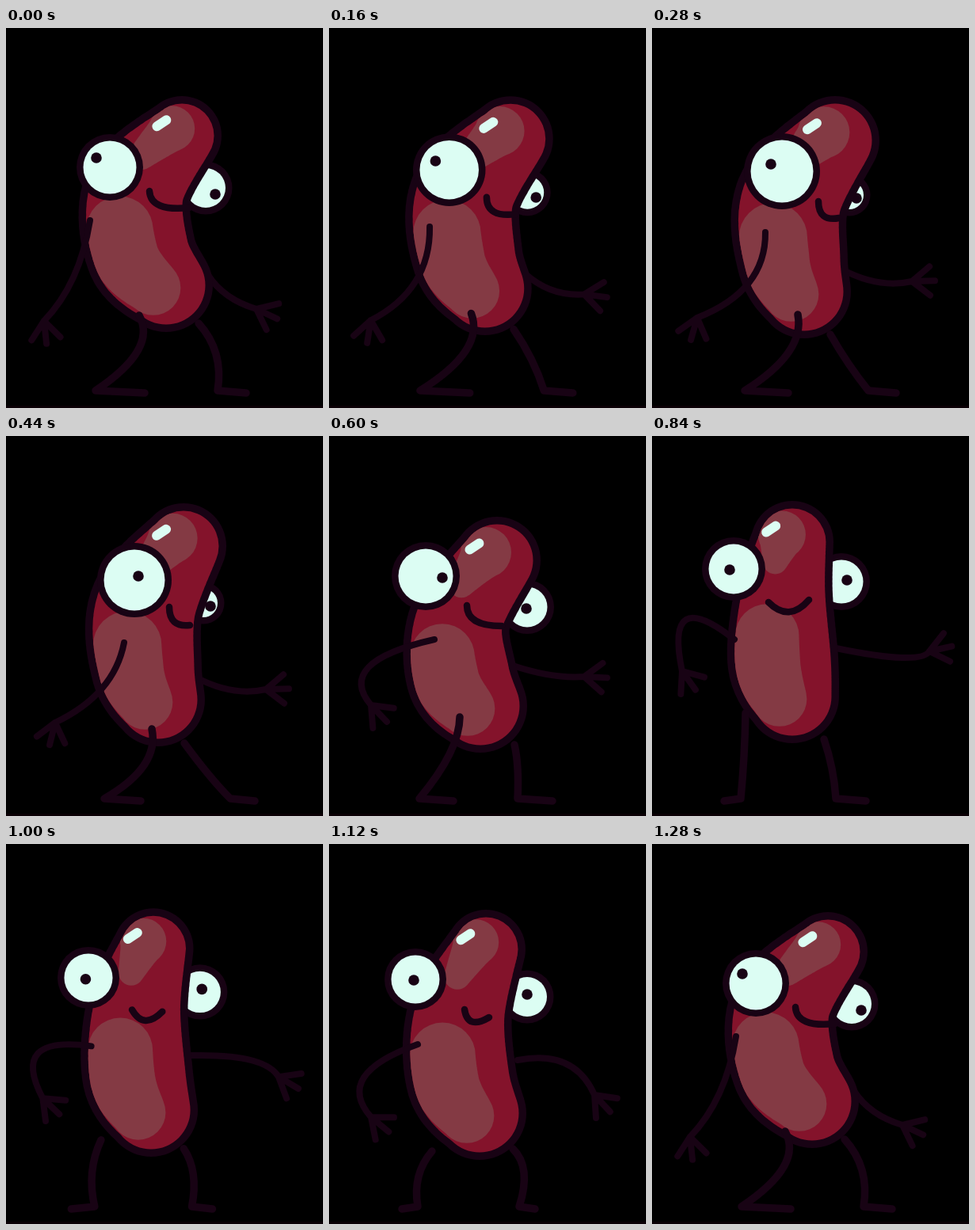
Recreate the animation shown at these times as an HTML page with a canvas. Size 400x480 px, loop 1320 ms.

```html
<!DOCTYPE html>
<html lang="en">
<head>
<meta charset="utf-8">
<title>Walking bean</title>
<style>
html, body { margin: 0; width: 100%; height: 100%; overflow: hidden; background: #000; }
canvas { display: block; width: 100vw; height: 100vh; }
</style>
</head>
<body>
<canvas id="stage" width="400" height="480"></canvas>
<script>
const ctx = document.getElementById('stage').getContext('2d');
const INK = '#180314', RED = '#84132b', SHINE = '#843a44', WHITE = '#dcfdf3';
const LOOP = 1320, STEP = 40, RETURN = 1280, GROUND = 458;

// head, chest: x, y, r.  hip: x, y.  eyes: x, y, r, pupil x, y.  mouth: its two ends.
// arms: shoulder, elbow, wrist.  legs: hip, knee, ankle x, foot length.
const start = {
  time: 0,
  head: [222,136,45], chest: [166,205,63], hip: [202,325],
  eyeL: [131,176,33.5, 114,164], eyeR: [252,202,25, 264,210], mouth: [181,206, 231,227],
  armL: [106,243, 85,315, 48,370], armR: [255,312, 280,338, 316,355],
  legL: [168,363, 166,408, 113,62], legR: [243,373, 265,412, 267,36]
};
const stride = {
  time: 280,
  head: [231,142,51], chest: [177,215,67], hip: [192,333],
  eyeL: [164,181,39.5, 150,172], eyeR: [249,211,18, 258,215], mouth: [210,219, 236,240],
  armL: [143,258, 122,322, 57,366], armR: [240,305, 285,321, 328,320],
  legL: [184,362, 172,410, 117,55], legR: [225,387, 248,424, 273,35]
};
const poses = [
  start,
  stride,
  {
    ...stride,
    time: 440,
    head: [224,139,49], eyeL: [162,182,38.5, 167,177], mouth: [206,216, 232,239],
    armL: [149,261, 121,319, 62,362],
    legL: [184,370, 174,416, 124,46], legR: [225,388, 256,428, 283,31]
  },
  {
    time: 600,
    head: [212,157,50], chest: [165,232,59], hip: [191,341],
    eyeL: [122,177,34.5, 143,179], eyeR: [250,216,25.5, 249,218], mouth: [174,214, 218,240],
    armL: [133,257, 50,292, 53,340], armR: [232,290, 280,302, 322,304],
    legL: [165,355, 152,402, 114,43], legR: [234,390, 238,420, 238,44]
  },
  {
    time: 840,
    head: [177,134,47], chest: [166,200,57], hip: [177,329],
    eyeL: [103,168,31.5, 98,169], eyeR: [239,184,27.5, 246,182], mouth: [147,210, 198,207],
    armL: [104,257, 43,232, 38,297], armR: [232,268, 315,280, 350,272],
    legL: [118,350, 116,405, 112,-21], legR: [217,383, 227,420, 232,38]
  },
  {
    time: 1120,
    head: [198,133,45], chest: [165,215,61], hip: [190,340],
    eyeL: [109,171,30.5, 107,172], eyeR: [250,193,25, 250,190], mouth: [171,209, 202,219],
    armL: [112,253, 44,295, 53,345], armR: [238,273, 298,277, 335,317],
    legL: [130,388, 113,420, 112,-20], legR: [232,385, 246,415, 240,20]
  }
];

const mix = (a, b, u) => a + (b - a) * u;

function spline(a, b, c, d, u) {
  return b + u / 2 * (c - a + u * (2 * a - 5 * b + 4 * c - d + u * (3 * (b - c) + d - a)));
}

function poseAt(time) {
  if (time >= RETURN) return start;
  const n = poses.length;
  const i = poses.findLastIndex(p => p.time <= time);
  const [before, from, to, after] = [-1, 0, 1, 2].map(k => poses[(i + k + n) % n]);
  const u = (time - from.time) / ((to.time || RETURN) - from.time);
  const pose = {};
  for (const part in from) {
    if (part === 'time') continue;
    pose[part] = from[part].map((v, k) => spline(before[part][k], v, to[part][k], after[part][k], u));
  }
  return pose;
}

function fill(path, color) {
  ctx.fillStyle = color;
  ctx.fill(path);
}

function stroke(path, width, color = INK) {
  ctx.lineWidth = width;
  ctx.strokeStyle = color;
  ctx.stroke(path);
}

function addDisc(path, x, y, r) {
  path.moveTo(x + r, y);
  path.arc(x, y, r, 0, 2 * Math.PI);
}

function disc(x, y, r) {
  const path = new Path2D();
  addDisc(path, x, y, r);
  return path;
}

// Head, chest, belly and hip circles that the bean is swept along.
function spineOf({ head, chest, hip }) {
  const belly = [mix(chest[0], hip[0], 0.2) - 3, mix(chest[1], hip[1], 0.65), 65];
  return [head, chest, belly, [...hip, 54]];
}

// Sweeps a circle along part of the spine; shape(circle, progress) may alter it.
function sweep(spine, from, to, shape) {
  const path = new Path2D(), last = spine.length - 1, count = 40;
  for (let k = 0; k <= count; k++) {
    const s = mix(from, to, k / count) * last, i = Math.min(last - 1, Math.floor(s));
    const at = j => spine[Math.max(0, Math.min(last, i + j))];
    const circle = [0, 1, 2].map(c => spline(at(-1)[c], at(0)[c], at(1)[c], at(2)[c], s - i));
    addDisc(path, ...shape(circle, k / count));
  }
  return path;
}

function bean(pose) {
  const spine = spineOf(pose), [x, y, r] = pose.head;
  const skin = sweep(spine, 0, 1, ([x, y, r]) => [x, y, r - 4.5]);
  fill(sweep(spine, 0, 1, ([x, y, r]) => [x, y, r + 5]), INK);
  fill(skin, RED);
  ctx.save();
  ctx.clip(skin);
  fill(sweep(spine, 0, 0.2, ([x, y, r], u) => [x - 0.28 * r, y - 0.2 * r, r * mix(0.64, 0.3, u)]), SHINE);
  fill(sweep(spine, 0.52, 1, ([x, y, r]) => [x - 0.3 * r, y + 0.06 * r, 0.64 * r]), SHINE);
  ctx.restore();
  const glint = new Path2D(), gx = x - 0.57 * r, gy = y - 0.35 * r;
  glint.moveTo(gx - 6, gy + 4);
  glint.lineTo(gx + 6, gy - 4);
  stroke(glint, 12, WHITE);
}

function eye([x, y, r, pupilX, pupilY]) {
  fill(disc(x, y, r + 8.5), INK);
  fill(disc(x, y, r), WHITE);
  fill(disc(pupilX, pupilY, 6.8), INK);
}

// The more level the mouth, the closer its dip is to the middle.
function mouth([x1, y1, x2, y2]) {
  const path = new Path2D();
  path.moveTo(x1, y1);
  path.quadraticCurveTo(x1 + Math.max(0, 0.45 * (x2 - x1) - (y2 - y1)), y1 + 26, x2, y2);
  stroke(path, 8.5);
}

// Bent limb that passes through its middle joint.
function limb(x1, y1, x2, y2, x3, y3) {
  const path = new Path2D();
  path.moveTo(x1, y1);
  path.quadraticCurveTo(2 * x2 - (x1 + x3) / 2, 2 * y2 - (y1 + y3) / 2, x3, y3);
  return path;
}

function arm(joints, turn) {
  const path = limb(...joints), [, , elbowX, elbowY, x, y] = joints;
  const angle = Math.atan2(y - elbowY, x - elbowX) + turn;
  for (const spread of [-0.68, 0, 0.68]) {
    path.moveTo(x, y);
    path.lineTo(x + 29 * Math.cos(angle + spread), y + 29 * Math.sin(angle + spread));
  }
  stroke(path, 8);
}

function leg([hipX, hipY, kneeX, kneeY, ankleX, foot]) {
  const path = limb(hipX, hipY, kneeX, kneeY, ankleX, GROUND);
  path.lineTo(ankleX + foot, GROUND + 3);
  stroke(path, 9.5);
}

function draw(pose) {
  ctx.fillStyle = '#000';
  ctx.fillRect(0, 0, 400, 480);
  ctx.fillStyle = '#0a0005';
  ctx.fillRect(0, 477, 400, 3);
  arm(pose.armR, 0);
  leg(pose.legR);
  eye(pose.eyeR);
  bean(pose);
  eye(pose.eyeL);
  mouth(pose.mouth);
  arm(pose.armL, -0.7);
  leg(pose.legL);
}

ctx.lineCap = ctx.lineJoin = 'round';

function frame() {
  const tick = Math.floor(performance.now() % LOOP / STEP) * STEP;
  draw(poseAt(tick < 2 * STEP ? 0 : tick));
  requestAnimationFrame(frame);
}
frame();
</script>
</body>
</html>
```
